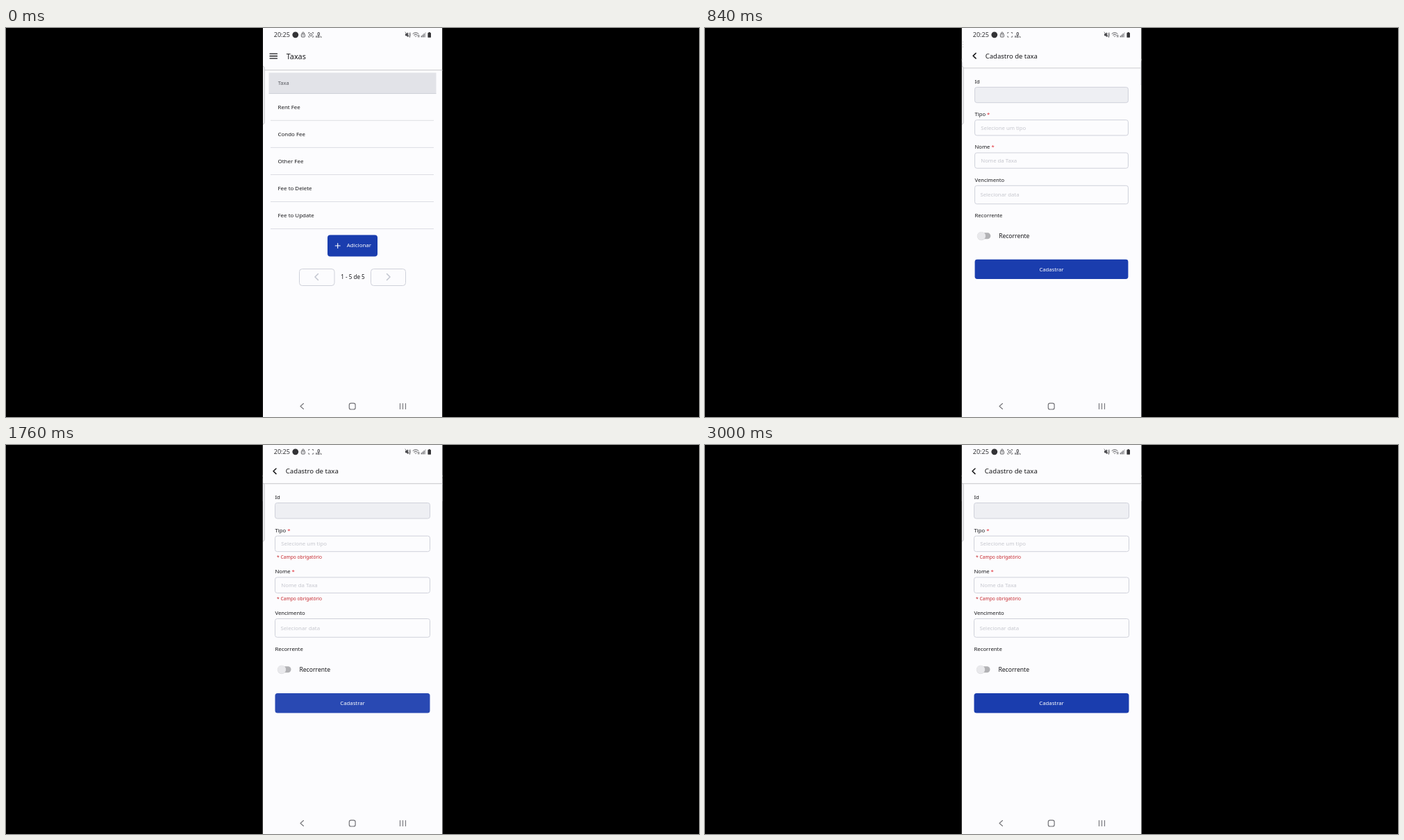
These frames come from a looping animation (998x561 px, 3080 ms). An HTML page:

```html
<!DOCTYPE html>
<html lang="pt">
<head>
<meta charset="utf-8">
<style>
  html, body { margin: 0; width: 100%; height: 100%; overflow: hidden; background: #000; }
  svg { display: block; width: 998px; height: 561px; font-family: "Noto Sans", "Open Sans", sans-serif; }
  .line { fill: none; stroke-linecap: round; stroke-linejoin: round; }
</style>
</head>
<body>
<svg id="stage" viewBox="0 0 998 561"></svg>
<script>
const LOOP = 3080, STEP = 40, CX = 499, CY = 280.5;
const INK = '#18181b', BLUE = '#1a3dae', PAPER = '#fcfcfe', BORDER = '#cfd1da', HINT = '#c6c7ce', RED = '#c62a2f';

const text = (x, y, size, str, fill = INK, extra = '') =>
  `<text x="${x}" y="${y}" font-size="${size}" fill="${fill}" ${extra}>${str}</text>`;
const rect = (x, y, w, h, r, fill, stroke = 'none', extra = '') =>
  `<rect x="${x}" y="${y}" width="${w}" height="${h}" rx="${r}" fill="${fill}" stroke="${stroke}" ${extra}/>`;
const line = (d, stroke, width = 1) =>
  `<path class="line" d="${d}" stroke="${stroke}" stroke-width="${width}"/>`;
const circle = (x, y, r, fill) => `<circle cx="${x}" cy="${y}" r="${r}" fill="${fill}"/>`;
const group = (id, body) => `<g id="${id}">${body}</g>`;
const medium = 'font-weight="500"';

const card = headerY =>
  rect(370, 0, 258.5, 561, 0, PAPER) +
  rect(370, headerY, 258.5, 1, 0, '#d3d3d6') +
  rect(370, headerY + 1, 258.5, 1, 0, '#efeff1');

function listScreen() {
  const rows = ['Rent Fee', 'Condo Fee', 'Other Fee', 'Fee to Delete', 'Fee to Update'];
  return card(60) +
    line('M380 37.2H390.5M380 40.5H390.5M380 43.8H390.5', INK, 1.3) +
    text(403.7, 44.5, 10.8, 'Taxas') +
    rect(378.5, 64.5, 241, 30, 0, '#e2e3e8') +
    rect(378.5, 94, 241, .8, 0, '#c9cbd3') +
    text(391.7, 82.2, 7.5, 'Taxa', '#55565c') +
    rows.map((name, i) =>
      text(391.5, 116.5 + i * 39.1, 7.95, name, INK, medium) +
      rect(381, 132.8 + i * 39.1, 235, .9, 0, '#d9dae0')).join('') +
    group('add',
      rect(463, 298.5, 72, 31, 4, BLUE) +
      line('M474.2 314H481.2M477.7 310.5V317.5', '#fff', 1.1) +
      text(490.8, 316.2, 7.95, 'Adicionar', '#fff')) +
    rect(422.5, 347.5, 50.5, 24, 4, 'none', BORDER) +
    rect(525.5, 347.5, 50, 24, 4, 'none', BORDER) +
    line('M449.5 354.5L445 359L449.5 363.5M548.5 354.5L553 359L548.5 363.5', '#c3c6d0', 1.5) +
    text(CX + .5, 362.3, 8.1, '1 - 5 de 5', INK, 'text-anchor="middle" ' + medium);
}

function field(label, labelY, top, height, hint, required) {
  const star = required ? ` <tspan fill="#e02b35">*</tspan>` : '';
  return text(387.4, labelY, 7.75, label + star, INK, medium) +
    rect(387.5, top, 223, height, 3, hint ? 'none' : '#eeeff3', BORDER) +
    text(hint === 'Selecionar data' ? 395.4 : 396.3, top + height / 2 + 2.9, 7.85, hint, HINT);
}

function formScreen() {
  const error = y => text(390, y, 6.7, '* Campo obrigatório', RED);
  return card(55) +
    line('M389 34L385 37.8L389 41.6', INK, 1.5) +
    text(402.8, 41.3, 9.6, 'Cadastro de taxa') +
    field('Id', 77.7, 83.5, 22.5, '') +
    field('Tipo', 125.7, 131.2, 22.5, 'Selecione um tipo', true) +
    group('name', field('Nome', 173.3, 179, 22.5, 'Nome da Taxa', true)) +
    group('errors', error(163.9) + error(223.7)) +
    group('rest',
      field('Vencimento', 221.2, 226.8, 26.7, 'Selecionar data') +
      text(387.4, 273.2, 7.8, 'Recorrente', INK, medium) +
      rect(393, 295.5, 17.5, 9, 4.5, '#b2b2b5') +
      circle(397, 300.3, 6.2, '#d6d6d9') + circle(397, 299.9, 6, '#e9e9ec') +
      text(422.4, 303.2, 8.65, 'Recorrente') +
      group('submit',
        rect(387.5, 334.3, 223, 28.5, 3.5, BLUE, 'none', 'id="submitBox"') +
        text(CX, 351.6, 7.75, 'Cadastrar', '#fff', 'id="submitText" text-anchor="middle"')));
}

function systemBars() {
  const grey = '#4c4c50', nav = '#737378';
  return text(385.7, 13.3, 9.1, '20:25', '#333336') +
    circle(416.8, 9.8, 4.4, '#333336') +
    rect(425.4, 8.6, 5, 4.4, .8, 'none', grey, 'stroke-width=".9"') +
    line('M426.4 8.5V7.6a1.5 1.5 0 0 1 3 0V8.5M427.9 10.3V11.2', grey, .9) +
    line('M435.8 7.8V6.5H437M441.2 6.5H442.4V7.8M442.4 11.8V13.1H441.2M437 13.1H435.8V11.8', grey, .8) +
    group('blink', `<circle cx="439.1" cy="9.8" r="1.8" fill="none" stroke="${grey}" stroke-width=".9"/>`) +
    text(450.3, 10.6, 7, '0', grey, 'text-anchor="middle" font-weight="600"') +
    text(450.3, 14.2, 3.8, 'KB/s', grey, 'text-anchor="middle" font-weight="600"') +
    `<path d="M575 8.3h1.6l2.4-2v7l-2.4-2H575z" fill="${grey}"/>` +
    line('M575 6L581.5 13.5M580.5 7.8Q581.6 9.8 580.5 11.5M582 6.8Q583 9.5 582 12.5', grey, .8) +
    line('M586 8.2Q590 5 594 8.2M587.5 10Q590 8 592.3 10M589.2 11.8L590 12.6L590.8 11.8', grey, .9) +
    line('M593.6 10.3V13M595 13V10.3', grey, .7) +
    line('M598.3 11.5V13M600.2 10V13M602.1 8.3V13', grey, 1) +
    line('M604 6.7V13', '#a9a9ad', 1) +
    rect(607.4, 6.8, 4.6, 7, .9, '#333336') + rect(608.7, 5.9, 2, 1.2, .3, '#333336') +
    line('M428.5 541.5L424 545.5L428.5 549.5', nav, 1.1) +
    rect(494.3, 541.2, 8.8, 8.8, 2.6, 'none', nav, 'stroke-width="1.2"') +
    line('M567.5 541.5V549.5M571.5 541.5V549.5M575.5 541.5V549.5', nav, 1.1) +
    `<path d="M370 55q2.3 .5 2.3 3V136q0 2.5-2.3 3" fill="#f1f1f3" stroke="#bdbdc0" stroke-width=".8"/>`;
}

const stage = document.getElementById('stage');
stage.innerHTML =
  `<clipPath id="phone">${rect(369.8, 0, 258.6, 561, 0, '#fff')}</clipPath>` +
  rect(0, 0, 998, 561, 0, '#000') +
  `<g clip-path="url(#phone)">` +
  group('list', listScreen()) + group('form', formScreen()) + systemBars() + '</g>';

const el = id => document.getElementById(id);
const set = (id, name, value) => el(id).setAttribute(name, value);
const ramp = (t, from, to) => Math.min(1, Math.max(0, (t - from) / (to - from)));
const pulse = (t, start, peak, hold, end) => ramp(t, start, peak) - ramp(t, hold, end);
const zoom = s => `translate(${CX} ${CY}) scale(${s}) translate(${-CX} ${-CY})`;

function render(t) {
  const p = 1 - (1 - ramp(t, 720, 920)) ** 3;
  set('list', 'transform', zoom(1 + .075 * p));
  set('form', 'transform', zoom(.85 + .15 * p));
  set('form', 'opacity', ramp(p, .75, .875));
  set('add', 'opacity', 1 - .34 * pulse(t, 400, 520, 560, 680));

  const invalid = t >= 1600;
  set('errors', 'opacity', +invalid);
  set('name', 'transform', `translate(0 ${invalid ? 11.9 : 0})`);
  set('rest', 'transform', `translate(0 ${invalid ? 23.75 : 0})`);

  const loading = t >= 1440 && t < 1600;
  const press = pulse(t, 1280, 1440, 1600, 1800) + pulse(t, 2160, 2280, 2300, 2400);
  set('submit', 'opacity', 1 - .34 * press);
  set('submitBox', 'height', loading ? 30 : 28.5);
  set('submitText', 'x', CX + (loading ? 9.5 : 0));

  set('blink', 'opacity', (t + 100) % 1000 < 500 ? 1 : 0);
}

function tick() {
  const t = performance.now() % LOOP;
  render(Math.floor(t / STEP) * STEP);
  requestAnimationFrame(tick);
}
tick();
</script>
</body>
</html>
```
